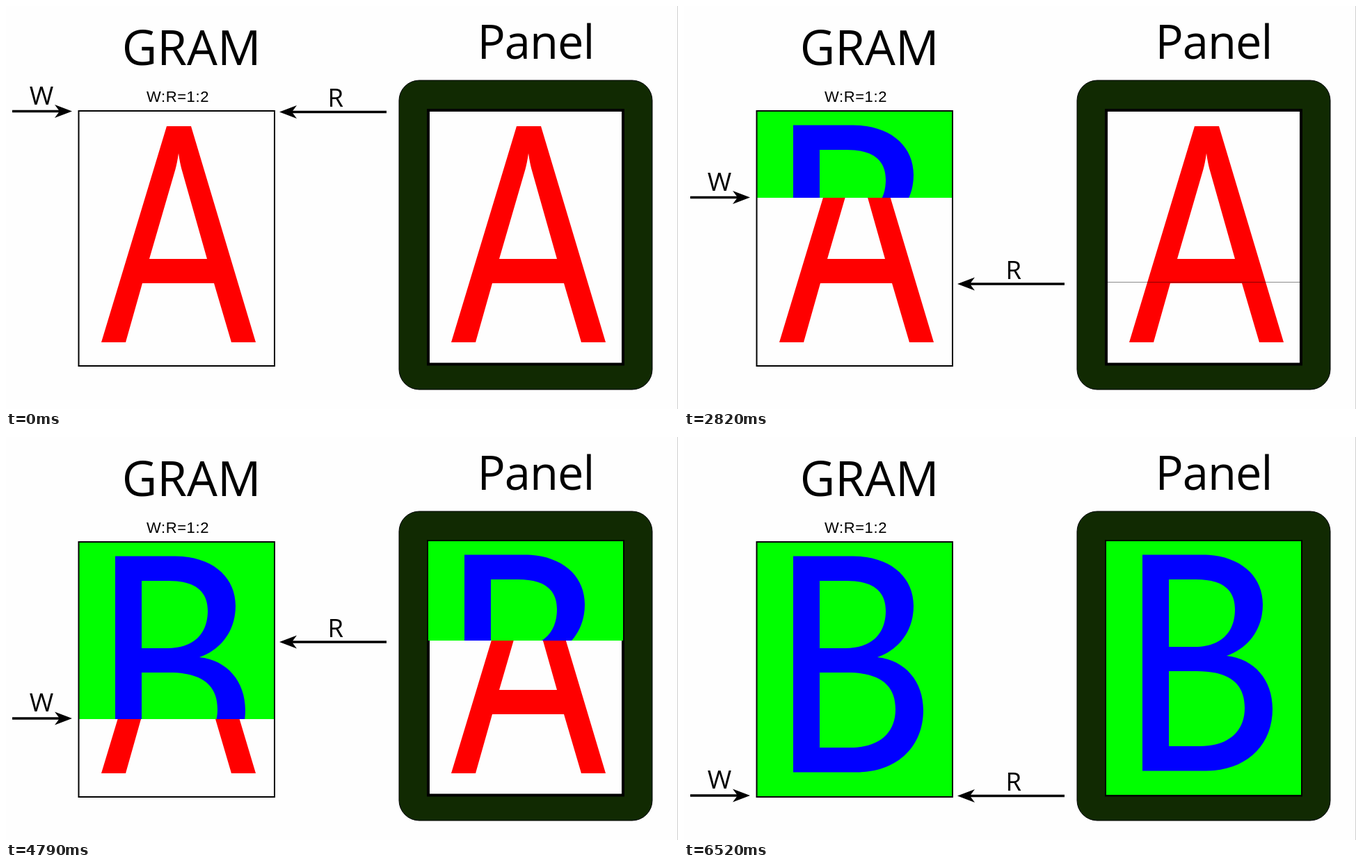
These frames come from a looping animation (966x580 px, 7460 ms). An HTML page:

```html
<!DOCTYPE html>
<html lang="en">
<head>
<meta charset="utf-8">
<title>GRAM write and panel read, 1:2</title>
<style>
  html, body { margin: 0; width: 100%; height: 100%; overflow: hidden; background: #fefefe; }
  svg { display: block; }
  .sans { font-family: "Open Sans", "Noto Sans", sans-serif; }
  .arial { font-family: "Liberation Sans", Arial, sans-serif; }
</style>
</head>
<body>
<svg width="966" height="580" viewBox="0 0 966 580">
  <defs>
    <path id="oldImage" fill="#f00" fill-rule="evenodd"
      d="M231 173H266L359 484H324L299 399H196L172 484H137Z
         M206 364H289L252.5 235Q250 226 248 212Q246 226 243.5 235Z"/>
    <path id="newImage" fill="#00f" fill-rule="evenodd"
      d="M157 171.5H243C296 171.5 330 201 330 243C330 279 309 306 278 317
         C318 321 344 352 344 393C344 447 305 482.5 248 482.5H157Z
         M195 207H234C272 207 290 222 290 250C290 284 269 304 232 304H195Z
         M195 339H235C282 339 304 357 304 392C304 427 279 447 240 447H195Z"/>
    <clipPath id="writtenClip"><rect id="written" x="104" y="151" width="281.5" height="0"/></clipPath>
    <clipPath id="shownClip"><rect id="shown" x="607" y="150" width="280" height="0"/></clipPath>
  </defs>

  <rect width="966" height="580" fill="#fefefe"/>
  <rect x="965" width="1" height="580" fill="#d0d0d0"/>

  <text class="sans" x="166.8" y="85" font-size="69.3">GRAM</text>
  <text class="sans" x="677.6" y="76" font-size="66.8" letter-spacing="-1">Panel</text>
  <text class="arial" x="202" y="137.7" font-size="22" letter-spacing=".6">W:R=1:2</text>

  <!-- memory -->
  <use href="#oldImage"/>
  <g clip-path="url(#writtenClip)">
    <rect x="104" y="151" width="282" height="367" fill="#0f0"/>
    <use href="#newImage"/>
  </g>
  <rect x="104.5" y="151" width="281.5" height="367" fill="none" stroke="#000" stroke-width="2"/>

  <!-- panel -->
  <rect x="565" y="107" width="364" height="445" rx="29" fill="#112a02" stroke="#000"/>
  <rect x="607" y="150" width="280" height="365.5" fill="#fefefe" stroke="#000" stroke-width="4"/>
  <use href="#oldImage" x="503"/>
  <rect id="scan" x="609" width="276" height="1" fill="#000" opacity=".45"/>
  <g clip-path="url(#shownClip)">
    <rect x="607" y="150" width="280" height="366" fill="#0f0"/>
    <use href="#newImage" x="502" y="-2"/>
  </g>

  <!-- pointers, drawn around y = 0 -->
  <g id="write">
    <path d="M9 0H80" stroke="#000" stroke-width="3.5"/>
    <path d="M95 0L70 -9.5L77 0L70 9.5Z"/>
    <text class="sans" x="51" y="-9.8" font-size="37.3" text-anchor="middle">W</text>
  </g>
  <g id="read">
    <path d="M547 0H408" stroke="#000" stroke-width="3.5"/>
    <path d="M393 0L418 -9.5L411 0L418 9.5Z"/>
    <text class="sans" x="462.4" y="-7.3" font-size="36.5">R</text>
  </g>
</svg>
<script>
const LOOP = 7460, STEP = 42, TOP = 152.5, BOTTOM = 516.5;

// time, write row, read row (read rows run on through the second pass)
const keys = [
  [930, 154, 156.1],
  [1370, 182.5, 213.8],
  [2170, 234.5, 318],
  [3470, 319, 487.5],
  [4790, 405, 659],
  [5760, 467, 783],
  [6520, 516, 880.5]
];

const el = id => document.getElementById(id);
const [written, shown, scan, write, read] =
  ["written", "shown", "scan", "write", "read"].map(el);

function rows(t) {
  if (t < keys[0][0]) return [151.5, TOP];
  const i = keys.findIndex(k => k[0] > t);
  if (i < 0) return keys[keys.length - 1].slice(1);
  const a = keys[i - 1], b = keys[i], span = b[0] - a[0];
  const n = Math.round(span / STEP);
  const p = Math.floor((t - a[0]) / span * n) / n;
  return [1, 2].map(j => a[j] + (b[j] - a[j]) * p);
}

function draw(t) {
  const [w, run] = rows(t);
  const second = run > BOTTOM;
  const r = second ? run - (BOTTOM - TOP) : run;

  write.setAttribute("transform", `translate(0 ${w})`);
  read.setAttribute("transform", `translate(0 ${r})`);

  const edge = t < keys[0][0] ? 151 : Math.round(w + 0.4 + (w - TOP) * 0.003);
  written.setAttribute("height", edge - 151);

  const front = Math.round(r - 2 + (r - 295) * 0.003);
  shown.setAttribute("height", second ? Math.max(0, front - 150) : 0);

  const line = Math.floor(r - 2.3);
  scan.setAttribute("y", line);
  scan.setAttribute("visibility", !second && line > 151 && line < 514 ? "visible" : "hidden");
}

const start = performance.now();
function tick() {
  draw((performance.now() - start) % LOOP);
  requestAnimationFrame(tick);
}
draw(0);
requestAnimationFrame(tick);
</script>
</body>
</html>
```
